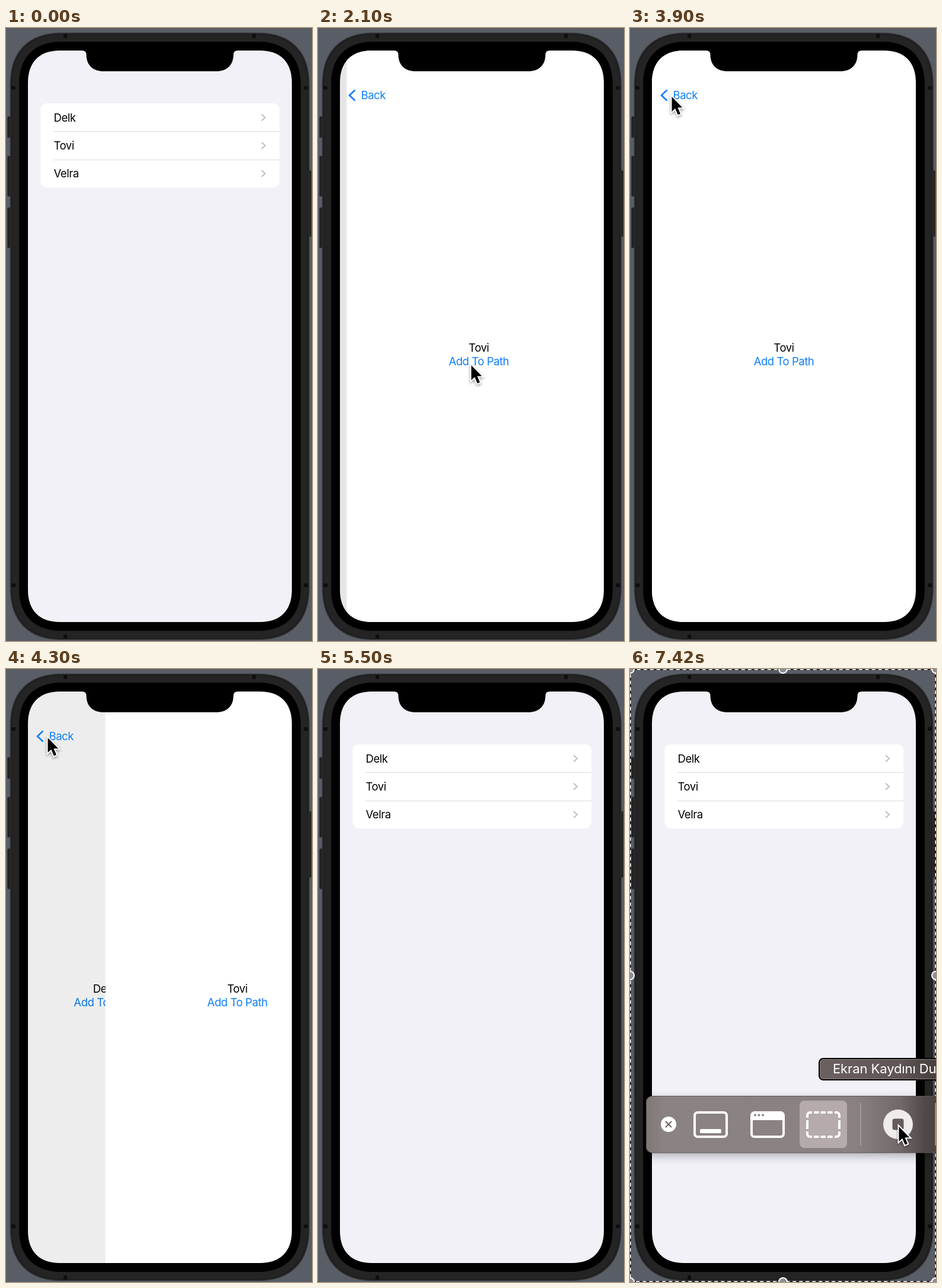
These frames come from a looping animation (516x1034 px, 7540 ms). An HTML page with a canvas:

```html
<!DOCTYPE html>
<html lang="en">
<head>
<meta charset="utf-8">
<title>Navigation path</title>
<style>
html, body { margin: 0; width: 100%; height: 100%; overflow: hidden; background: #595d66; }
canvas { display: block; width: 516px; height: 1034px; }
</style>
</head>
<body>
<canvas></canvas>
<script>
const W = 516, H = 1034, LOOP = 7540, STEP = 100;
const SCREEN = { x: 37, y: 38, w: 445, h: 964 };
const FONT = 'Inter, "Open Sans", sans-serif';
const BLUE = '15,126,245';
const NAMES = ['Delk', 'Tovi', 'Velra'];
const PAGES = [null, NAMES[0], NAMES[1], NAMES[1]];

// Navigation: start time and the depth it leads to
const MOVES = [[889, 1], [1896, 2], [2298, 3], [3988, 2], [4260, 1], [4533, 0]];

// Pointer: time, x, y; null hides it
const POINTER = [
  [0, null], [100, 390, 355], [200, 390, 355], [300, 294, 101], [400, 302, 143],
  [1100, 302, 143], [1600, 249, 487], [1700, 258, 569], [3200, 258, 569],
  [3500, 190, 380], [3800, 78, 128], [3900, 70, 116], [4600, 70, 116], [4800, 95, 150],
  [5200, 330, 600], [5400, 415, 783], [5500, null], [7200, 488, 764], [7300, 453, 772], [LOOP, 453, 772]
];

const canvas = document.querySelector('canvas');
const ctx = canvas.getContext('2d');
const dpr = window.devicePixelRatio || 1;
canvas.width = W * dpr;
canvas.height = H * dpr;

function box(x, y, w, h, r, fill, stroke, line = 1) {
  ctx.beginPath();
  ctx.roundRect(x, y, w, h, r);
  if (fill) { ctx.fillStyle = fill; ctx.fill(); }
  if (stroke) { ctx.strokeStyle = stroke; ctx.lineWidth = line; ctx.stroke(); }
}

function disc(x, y, r, fill) {
  ctx.beginPath();
  ctx.arc(x, y, r, 0, 7);
  ctx.fillStyle = fill;
  ctx.fill();
}

function poly(points, stroke, line) {
  ctx.beginPath();
  points.forEach(([x, y]) => ctx.lineTo(x, y));
  ctx.strokeStyle = stroke;
  ctx.lineWidth = line;
  ctx.stroke();
}

function text(str, x, y, fill, align = 'left', size = 18.5, spacing = -0.45) {
  ctx.font = `400 ${size}px ${FONT}`;
  ctx.letterSpacing = spacing + 'px';
  ctx.textAlign = align;
  ctx.fillStyle = fill;
  ctx.fillText(str, x, y);
}

// Rounded rectangle with smooth, continuous corners
function smoothRect({ x, y, w, h }, r) {
  const k = r * 0.36, R = x + w, B = y + h;
  ctx.beginPath();
  ctx.moveTo(x + r, y);
  ctx.lineTo(R - r, y);
  ctx.bezierCurveTo(R - k, y, R, y + k, R, y + r);
  ctx.lineTo(R, B - r);
  ctx.bezierCurveTo(R, B - k, R - k, B, R - r, B);
  ctx.lineTo(x + r, B);
  ctx.bezierCurveTo(x + k, B, x, B - k, x, B - r);
  ctx.lineTo(x, y + r);
  ctx.bezierCurveTo(x, y + k, x + k, y, x + r, y);
  ctx.closePath();
}

function drawBody() {
  ctx.fillStyle = '#595d66';
  ctx.fillRect(0, 0, W, H);
  for (const [y, h] of [[149, 36], [216, 68], [303, 68]]) box(2.5, y, 8, h, 2, '#1f2123', '#35383d');
  box(506, 240, 8.5, 112, 2, '#211f1d', '#3a3835');
  smoothRect({ x: 7.5, y: 8.5, w: 503.5, h: 1023 }, 86);
  ctx.fillStyle = '#1d1d1d';
  ctx.fill();
  ctx.strokeStyle = '#343537';
  ctx.lineWidth = 1.5;
  ctx.stroke();
  smoothRect({ x: 16, y: 17, w: 486.5, h: 1006 }, 78);
  ctx.strokeStyle = '#242424';
  ctx.lineWidth = 12;
  ctx.stroke();
  ctx.fillStyle = '#0e0e0e';
  for (const [x, y] of [[97, 10], [415, 10], [97, 1023]]) ctx.fillRect(x, y, 6, 7);
  for (const y of [98, 937]) {
    ctx.fillRect(9, y, 7, 6);
    ctx.fillRect(502, y, 7, 6);
  }
  smoothRect({ x: 22, y: 23, w: 475, h: 994 }, 72);
  ctx.fillStyle = '#000';
  ctx.fill();
}

function drawNotch() {
  ctx.beginPath();
  ctx.moveTo(128, 37);
  ctx.lineTo(128, 38);
  ctx.quadraticCurveTo(135.5, 38, 135.5, 45);
  ctx.bezierCurveTo(135.5, 63, 147, 73, 165, 73);
  ctx.lineTo(354, 73);
  ctx.bezierCurveTo(372, 73, 383.5, 63, 383.5, 45);
  ctx.quadraticCurveTo(383.5, 38, 391, 38);
  ctx.lineTo(391, 37);
  ctx.fillStyle = '#000';
  ctx.fill();
}

function drawList(glow) {
  ctx.fillStyle = '#f2f1f8';
  ctx.fillRect(37, 38, 445, 964);
  box(58.5, 127, 402.5, 142, 10, '#fff');
  if (glow > 0) box(58.5, 127, 402.5, 47, [10, 10, 0, 0], `rgba(209,209,214,${glow})`);
  NAMES.forEach((name, i) => {
    const y = 151 + i * 47.3;
    text(name, 80.5, y + 6.5, '#000');
    poly([[431, y - 5.5], [437, y], [431, y + 5.5]], '#bfbfc3', 2);
    if (i) {
      ctx.fillStyle = '#dcdcdf';
      ctx.fillRect(80, Math.round(y - 24), 381, 1);
    }
  });
}

function drawDetail(name, pressed) {
  ctx.fillStyle = '#fff';
  ctx.fillRect(37, 38, 445, 964);
  text(name, 259.5, 546, '#000', 'center');
  text('Add To Path', 259.5, 568.5, `rgba(${BLUE},${pressed ? 0.3 : 1})`, 'center');
}

function drawBack(dx, alpha) {
  const ink = `rgba(${BLUE},${alpha})`;
  poly([[62.5 + dx, 104.5], [53 + dx, 113.5], [62.5 + dx, 122.5]], ink, 2.6);
  text('Back', 72.5 + dx, 120, ink);
}

function drawPage(depth, dx, t) {
  ctx.save();
  ctx.translate(dx, 0);
  if (depth) drawDetail(PAGES[depth], t === 1900 || t === 2300);
  else drawList(t >= 900 && t < 1300 ? 1 - (t - 900) / 250 : 0);
  ctx.restore();
}

// Critically damped spring, 0 to 1
function spring(ms) {
  const x = 0.027 * ms;
  return 1 - Math.exp(-x) * (1 + x);
}

function drawScreen(t) {
  let from = 0, to = 0, start = -1e5;
  for (const [at, depth] of MOVES) {
    if (t >= at) { from = to; to = depth; start = at; }
  }
  const p = spring(t - start);
  const cover = to >= from ? p : 1 - p;
  const top = Math.max(from, to), low = Math.min(from, to);

  ctx.save();
  smoothRect(SCREEN, 54);
  ctx.clip();
  if (top === low || cover < 0.0005) {
    drawPage(low, 0, t);
  } else {
    const dx = SCREEN.w * (1 - cover);
    drawPage(low, -0.3 * SCREEN.w * cover, t);
    ctx.fillStyle = `rgba(0,0,0,${0.1 * cover})`;
    ctx.fillRect(37, 38, dx, 964);
    drawPage(top, dx, t);
  }
  if (low) drawBack(0, 1);
  else if (top) drawBack(to ? 0 : SCREEN.w * (1 - cover), to ? cover : Math.min(1, cover * 1.15));
  ctx.restore();
}

function drawPointer(t) {
  const i = POINTER.findLastIndex(k => k[0] <= t);
  const a = POINTER[i], b = POINTER[i + 1];
  if (a[1] === null) return;
  const u = b && b[1] !== null && t < 5500 ? (t - a[0]) / (b[0] - a[0]) : 0;
  const x = a[1] + (u ? (b[1] - a[1]) * u : 0);
  const y = a[2] + (u ? (b[2] - a[2]) * u : 0);
  ctx.save();
  ctx.translate(x, y);
  ctx.beginPath();
  for (const [px, py] of [[0.5, 0], [0.5, 25], [6.2, 19.8], [10.8, 30.5], [15, 28.7], [10.4, 18.2], [18.3, 18.2]]) ctx.lineTo(px, py);
  ctx.closePath();
  ctx.shadowColor = 'rgba(0,0,0,.4)';
  ctx.shadowBlur = 4 * dpr;
  ctx.shadowOffsetY = 2 * dpr;
  ctx.strokeStyle = '#fff';
  ctx.lineWidth = 4;
  ctx.stroke();
  ctx.shadowColor = 'transparent';
  ctx.fillStyle = '#000';
  ctx.fill();
  ctx.restore();
}

function drawSelection() {
  ctx.strokeStyle = '#111';
  ctx.lineWidth = 1.5;
  ctx.strokeRect(0.75, 0.75, W - 1.5, H - 1.5);
  ctx.setLineDash([6, 5]);
  ctx.strokeStyle = '#fff';
  ctx.strokeRect(0.75, 0.75, W - 1.5, H - 1.5);
  ctx.setLineDash([]);
  for (const x of [0, 258, 516]) {
    for (const y of [0, 517, 1034]) {
      if (x === 258 && y === 517) continue;
      disc(x, y, 8, '#fff');
      disc(x, y, 6, '#8e8e8e');
    }
  }
}

function drawToolbar() {
  const shade = ctx.createLinearGradient(27, 0, 516, 0);
  [[0, '#7f7776'], [0.06, '#8b8382'], [0.72, '#8a8281'], [0.88, '#716867'], [0.96, '#51494a'], [1, '#4b4343']]
    .forEach(([at, color]) => shade.addColorStop(at, color));
  ctx.save();
  ctx.shadowColor = 'rgba(0,0,0,.3)';
  ctx.shadowBlur = 16 * dpr;
  ctx.shadowOffsetY = 5 * dpr;
  box(27, 720.5, 520, 95.5, 10, shade);
  ctx.restore();
  box(27.5, 720.5, 520, 95.5, 10, null, '#5a5352');

  disc(65, 768, 13, '#fff');
  poly([[60, 763], [70, 773]], '#6f6766', 2.2);
  poly([[70, 763], [60, 773]], '#6f6766', 2.2);

  box(109, 748, 54, 41, 5, null, '#fff', 4);
  box(118, 776, 36, 7, 2, '#fff');

  box(205, 748, 54, 41, 5, null, '#fff', 4);
  ctx.fillStyle = '#fff';
  ctx.fillRect(205, 748, 54, 13);
  for (const x of [211, 217.5, 224]) disc(x, 752.5, 2, '#8b8382');

  box(286, 728, 80, 80, 8, '#b4abaa');
  for (const [sx, x] of [[1, 299], [-1, 353]]) {
    for (const [sy, y] of [[1, 748], [-1, 789]]) {
      ctx.beginPath();
      ctx.moveTo(x, y + sy * 9);
      ctx.arcTo(x, y, x + sx * 9, y, 5);
      ctx.lineTo(x + sx * 8, y);
      ctx.strokeStyle = '#fff';
      ctx.lineWidth = 4;
      ctx.stroke();
    }
  }
  ctx.fillStyle = '#fff';
  for (const y of [746, 787]) {
    for (const x of [310, 321.5, 333]) ctx.fillRect(x, y, 8.5, 4);
  }
  for (const x of [297, 351]) ctx.fillRect(x, 761, 4, 15);

  ctx.fillStyle = '#aaa3a2';
  ctx.fillRect(388, 732, 1.5, 72);
  ctx.fillRect(514.5, 732, 1.5, 72);
  disc(452, 768, 25, '#f0ecec');
  box(442.5, 758.5, 19, 19, 3.5, '#655c5b');
}

function drawTip() {
  const shade = ctx.createLinearGradient(319, 0, 516, 0);
  shade.addColorStop(0, '#6b6160');
  shade.addColorStop(0.7, '#5f5554');
  shade.addColorStop(1, '#463e3e');
  box(319, 657, 230, 36, 7, shade, '#000', 2);
  box(320.5, 658.5, 227, 33, 6, null, '#8b8281');
  text('Ekran Kaydını Durdur', 342, 682, '#fff', 'left', 22, -0.1);
}

function draw(ms) {
  const t = ms >= 7420 ? 7420 : Math.min(7300, Math.floor(ms / STEP) * STEP);
  ctx.setTransform(dpr, 0, 0, dpr, 0, 0);
  drawBody();
  drawScreen(t);
  drawNotch();
  if (t >= 6700) {
    drawSelection();
    drawToolbar();
  }
  if (t >= 7420) drawTip();
  drawPointer(t);
}

const begin = performance.now();
function tick() {
  draw((performance.now() - begin) % LOOP);
  requestAnimationFrame(tick);
}
tick();
</script>
</body>
</html>
```
